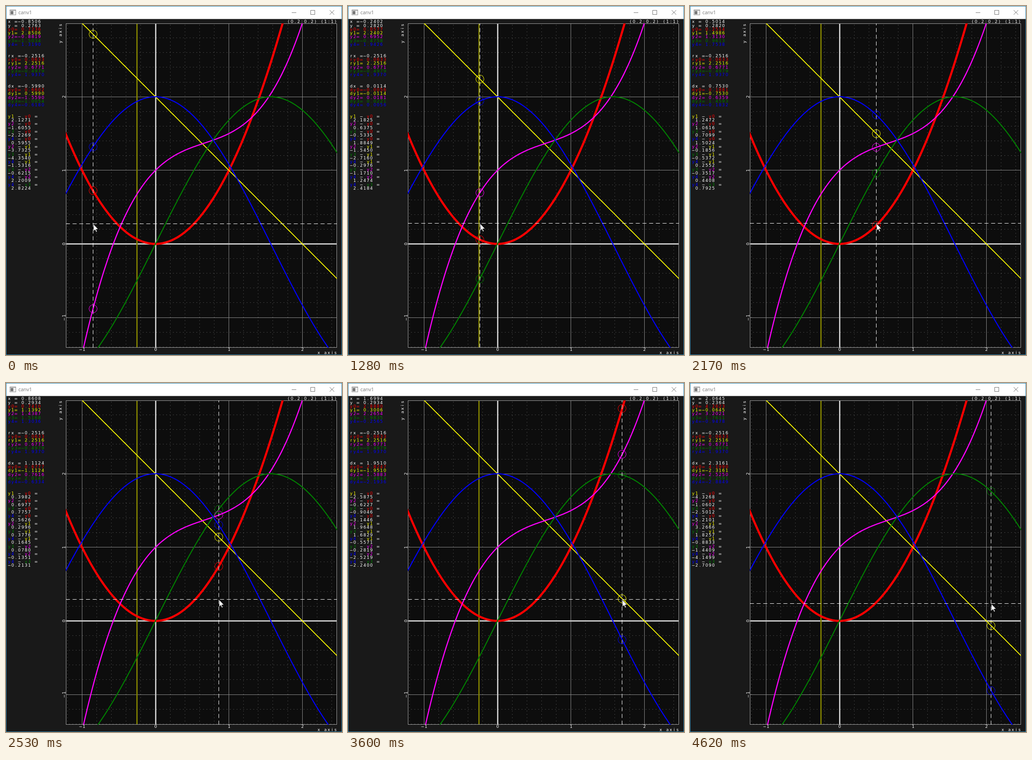
Write an HTML page with a canvas that moves like this. It is 735 px wide and 762 px high and loops after 5210 ms.

```html
<!DOCTYPE html>
<html lang="en">
<head>
<meta charset="utf-8">
<title>canv1</title>
<style>
html, body { margin: 0; width: 100%; height: 100%; overflow: hidden; background: #191919; }
canvas { display: block; }
</style>
</head>
<body>
<canvas id="stage" width="735" height="762"></canvas>
<script>
const W = 735, H = 762, LOOP = 5210;
const LEFT = 131, TOP = 38, RIGHT = 724, BOTTOM = 746;
const OX = 327, OY = 519.4, UNIT = 160.6;
const CELL = 7.33, LINE = 8.26;
const WHITE = '#fff';

const curves = [
  { color: '#f00', width: 4.6, fn: x => x * x },
  { color: '#ff0', width: 1.8, fn: x => 2 - x },
  { color: '#f0f', width: 2.4, fn: x => 1 + x - x * x + x * x * x / 2 },
  { color: '#008000', width: 2.2, fn: x => 2 * Math.sin(x) },
  { color: '#00f', width: 2.2, fn: x => 2 * Math.cos(x) }
];

// Pointer path: time, steps taken to get there, column, row
const path = [
  [0, 0, 0, 0], [410, 1, 5, 0], [740, 7, 57, 0], [920, 4, 75, 1],
  [970, 1, 79, 1], [1280, 7, 107, 1], [1480, 4, 133, 1], [1530, 1, 140, 1],
  [1840, 7, 185, 0], [2020, 4, 213, 0], [2070, 1, 221, 1], [2530, 10, 300, 3],
  [2580, 1, 309, 3], [2630, 1, 317, 3], [3140, 11, 396, 3], [3190, 1, 402, 3],
  [3600, 9, 447, 3], [3700, 2, 457, 3], [3730, 1, 461, 2], [4110, 7, 497, -3],
  [4290, 1, 500, -4], [4620, 5, 511, -7]
];

const STEP = 0.0057048;
const colToX = c => -0.85062 + c * STEP;
const rowToY = r => 0.2763 + r * STEP;
const REF = colToX(105);
const px = x => OX + x * UNIT;
const py = y => OY - y * UNIT;
const snap = v => Math.floor(v) + 0.5;

const poses = [{ t: 0, x: colToX(0), y: rowToY(0) }];
for (let i = 1; i < path.length; i++) {
  const [t0, , c0, r0] = path[i - 1];
  const [t1, n, c1, r1] = path[i];
  for (let k = 1; k <= n; k++) {
    const mix = (a, b) => a + (b - a) * k / n;
    poses.push({
      t: Math.ceil(mix(t0, t1) / 10) * 10,
      x: colToX(Math.round(mix(c0, c1))),
      y: rowToY(Math.round(mix(r0, r1)))
    });
  }
}

// Text on a fixed grid of cells, with a wide minus
function makeText(g) {
  return (str, x, mid, color = WHITE) => {
    g.font = '9px "DejaVu Sans", sans-serif';
    g.textAlign = 'center';
    g.fillStyle = color;
    [...str.replace(/-/g, '\u2212')].forEach((ch, i) =>
      g.fillText(ch, x + i * CELL + 3.2, mid + 3.2));
    g.textAlign = 'left';
  };
}

function line(g, x1, y1, x2, y2, color, width = 1, dash = []) {
  g.strokeStyle = color;
  g.lineWidth = width;
  g.setLineDash(dash);
  g.beginPath();
  g.moveTo(x1, y1);
  g.lineTo(x2, y2);
  g.stroke();
  g.setLineDash([]);
}

function clipPlot(g) {
  g.save();
  g.beginPath();
  g.rect(LEFT, TOP, RIGHT - LEFT, BOTTOM - TOP);
  g.clip();
}

function drawWindow(g) {
  g.fillStyle = '#191919';
  g.fillRect(0, 0, W, H);
  g.fillStyle = WHITE;
  g.fillRect(0, 0, W, 28.4);
  g.strokeStyle = '#2b84b0';
  g.strokeRect(0.5, 0.5, W - 1, H - 1);

  g.fillStyle = '#999';
  g.fillRect(8, 8, 14, 12);
  g.fillStyle = '#eee';
  g.fillRect(9, 10, 12, 9);
  g.fillStyle = '#777';
  g.fillRect(10, 11, 6, 7);

  g.font = '11px "Open Sans", sans-serif';
  g.fillStyle = '#777';
  g.fillText('canv1', 27, 18);

  const ink = '#777';
  line(g, 625, 14.5, 635, 14.5, ink);
  g.strokeStyle = ink;
  g.strokeRect(666.5, 9.5, 9, 9);
  line(g, 708, 9, 718, 19, ink);
  line(g, 708, 19, 718, 9, ink);
}

function drawGrid(g) {
  g.fillStyle = '#0d0d0d';
  g.fillRect(LEFT, TOP, RIGHT - LEFT, BOTTOM - TOP);
  const across = (v, ...pen) => line(g, LEFT, snap(py(v)), RIGHT, snap(py(v)), ...pen);
  const down = (v, ...pen) => line(g, snap(px(v)), BOTTOM, snap(px(v)), TOP, ...pen);
  clipPlot(g);
  for (let i = -8; i < 16; i++) {
    if (i % 5 === 0) continue;
    across(i / 5, '#808080', 1, [1, 6.33]);
    down(i / 5, '#808080', 1, [1, 6.33]);
  }
  for (const v of [-1, 1, 2]) {
    across(v, '#8a8a8a');
    down(v, '#8a8a8a');
  }
  across(0, '#c4c4c4', 2.8);
  down(0, '#d0d0d0', 2.8);
  down(REF, '#808000', 2.8);
  g.restore();
  g.strokeStyle = '#a0a0a0';
  g.strokeRect(LEFT + 0.5, TOP + 0.5, RIGHT - LEFT - 1, BOTTOM - TOP - 1);
}

function drawCurves(g) {
  clipPlot(g);
  for (const { color, width, fn } of curves) {
    g.strokeStyle = color;
    g.lineWidth = width;
    g.beginPath();
    for (let x = -1.26; x < 2.5; x += 0.02) g.lineTo(px(x), py(fn(x)));
    g.stroke();
  }
  g.restore();
}

function drawLabels(g) {
  const text = makeText(g);
  const upright = (str, x, mid) => {
    g.save();
    g.translate(x, mid);
    g.rotate(-Math.PI / 2);
    text(str, -str.length * CELL / 2 + 0.5, 0);
    g.restore();
  };
  for (const v of [-1, 0, 1, 2]) {
    const s = String(v);
    text(s, px(v) - s.length * CELL / 2 + 0.9, 750);
    upright(s, 127, py(v));
  }
  text('(0.2:0.2) (1:1)', 615, 34);
  text('x axis', 681, 757);
  upright('y axis', 119, 60);
}

const back = document.createElement('canvas');
back.width = W;
back.height = H;
const bg = back.getContext('2d');
drawWindow(bg);
drawGrid(bg);
drawCurves(bg);
drawLabels(bg);

const ctx = document.getElementById('stage').getContext('2d');
const text = makeText(ctx);
const num = v => (v < 0 ? '-' : ' ') + Math.abs(v).toFixed(4);

function drawReadout(x, y) {
  let row = 0;
  const at = () => 34.2 + LINE * row++;
  const put = (str, color) => text(str, 4, at(), color);
  const list = (name, value) =>
    curves.forEach((c, i) => put(name + i + '=' + num(value(c.fn)), c.color));

  put('x =' + num(x));
  put('y =' + num(y));
  list('y', f => f(x));
  row += 2;
  put('rx =' + num(REF));
  list('ry', f => f(REF));
  row += 2;
  put('dx =' + num(x - REF));
  list('dy', f => f(x) - f(REF));
  row += 2;

  for (let b = 0; b < 4; b++) {
    for (let a = b + 1; a < 5; a++) {
      const mid = at();
      text('y' + a, 4, mid, curves[a].color);
      text('-', 4 + 3 * CELL, mid);
      text('y' + b, 4 + 5 * CELL, mid, curves[b].color);
      text('=', 4 + 8 * CELL, mid);
      put(num(curves[a].fn(x) - curves[b].fn(x)));
    }
  }
}

function ring(cx, cy, color) {
  ctx.strokeStyle = color;
  ctx.lineWidth = 1;
  ctx.beginPath();
  for (let i = 0; i < 10; i++) {
    const a = i * Math.PI / 5;
    ctx.lineTo(cx + 9 * Math.cos(a), cy + 9 * Math.sin(a));
  }
  ctx.closePath();
  ctx.stroke();
}

const arrow = new Path2D('M0 0V15.5L3.6 12.2L6 17.6L8.2 16.6L5.8 11.4L10.6 11.2Z');

function drawPointer(x, y) {
  const cx = snap(px(x));
  const cy = snap(py(y));
  clipPlot(ctx);
  line(ctx, LEFT, cy, RIGHT, cy, WHITE, 1, [8.8, 5.86]);
  line(ctx, cx, BOTTOM, cx, TOP, WHITE, 1, [8.8, 5.86]);
  for (const { color, fn } of curves) ring(cx, py(fn(x)), color);
  ctx.restore();

  ctx.save();
  ctx.translate(cx + 0.7, cy + 0.7);
  ctx.fillStyle = WHITE;
  ctx.strokeStyle = '#000';
  ctx.lineWidth = 0.8;
  ctx.fill(arrow);
  ctx.stroke(arrow);
  ctx.restore();
}

function render(time) {
  const t = time % LOOP;
  let pose = poses[0];
  for (const p of poses) if (p.t <= t) pose = p;
  ctx.drawImage(back, 0, 0);
  drawReadout(pose.x, pose.y);
  drawPointer(pose.x, pose.y);
}

const start = performance.now();
function tick() {
  render(performance.now() - start);
  requestAnimationFrame(tick);
}
tick();
</script>
</body>
</html>
```
